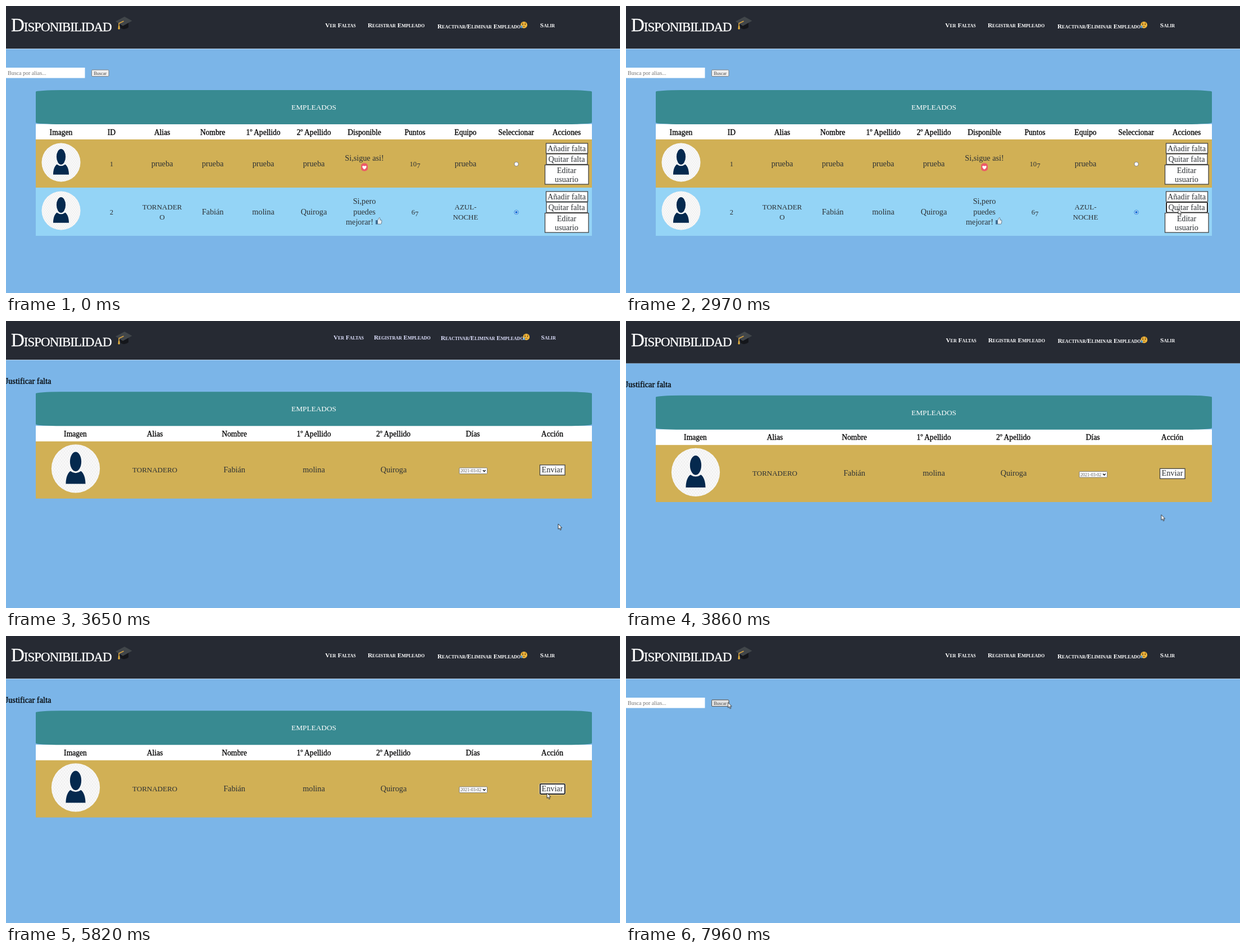
An HTML page for the animation above (8 s loop, 1093 by 512 pixels).

```html
<!DOCTYPE html>
<html lang="es">
<head>
<meta charset="utf-8">
<title>Disponibilidad</title>
<style>
html, body { margin: 0; width: 100%; height: 100%; overflow: hidden; background: #7bb5e8; }
svg { display: block; width: 1093px; height: 512px; }
text { font: 14.2px "Liberation Serif", "Noto Serif", serif; fill: #2c3034; text-anchor: middle; }
.head { font-size: 13.6px; fill: #000; stroke: #000; stroke-width: .3px; }
.caps { font-size: 13px; }
.num { font-size: 12.6px; }
.banner { font-size: 13.3px; fill: #fff; }
.title { font-size: 33px; font-variant: small-caps; letter-spacing: -1px; fill: #fff; stroke: #fff; stroke-width: .3px; text-anchor: start; }
.nav text { font-size: 11.3px; font-weight: bold; font-variant: small-caps; fill: inherit; }
.h1 { font-size: 14.4px; fill: #000; stroke: #000; stroke-width: .3px; text-anchor: start; }
.hint { font-size: 10px; fill: #757575; text-anchor: start; }
.small { font-size: 8.2px; fill: #444; }
.day { font-size: 8px; fill: #555; text-anchor: start; }
.picked { fill: #fff; }
.btn { fill: #fff; stroke: #444; stroke-width: 1.3px; }

/* scenes and states switch hard */
.staff, .search, .absence, .focus1, .focus2, .options, .hover { animation: 8s step-end infinite; }
.staff { animation-name: staff; }
.search { animation-name: search; }
.absence { animation-name: absence; }
.focus1 { animation-name: focus1; }
.focus2 { animation-name: focus2; }
.options { animation-name: options; }
.hover { animation-name: hover; }
@keyframes staff { 0% { visibility: visible } 42.5%, 100% { visibility: hidden } }
@keyframes search { 0%, 84.375% { visibility: visible } 42.5% { visibility: hidden } }
@keyframes absence { 0%, 84.375%, 100% { visibility: hidden } 42.5% { visibility: visible } }
@keyframes focus1 { 0%, 42.5%, 100% { visibility: hidden } 30.875% { visibility: visible } }
@keyframes focus2 { 0%, 84.375%, 100% { visibility: hidden } 71.1% { visibility: visible } }
@keyframes options { 0%, 61.5%, 100% { visibility: hidden } 57.7% { visibility: visible } }
@keyframes hover { 0% { visibility: hidden } 99.3%, 100% { visibility: visible } }

/* menu grows in and pushes the page down */
.push { animation: push 8s linear infinite; }
@keyframes push {
  0%, 42.49% { transform: none }
  42.5%, 43.4% { transform: translateY(-26px); animation-timing-function: cubic-bezier(.3, .3, .6, .9) }
  45.625% { transform: translateY(-7px); animation-timing-function: ease-out }
  49%, 100% { transform: none }
}
.nav { fill: #fff; animation: nav 8s linear infinite; }
@keyframes nav {
  0%, 42.49% { transform: none; fill: #fff }
  42.5% { transform: translate(var(--dx), -35px) scale(.83); fill: #00e; animation-timing-function: cubic-bezier(.3, .3, .5, .9) }
  45.625% { transform: translate(calc(var(--dx) * .115), -5.5px) scale(.98); fill: #e0e2ff; animation-timing-function: ease-out }
  49%, 100% { transform: none; fill: #fff }
}

.cursor { animation: cursor 8s ease-in-out infinite; }
@keyframes cursor {
  0%, .7% { transform: translate(1066px, 514px) }
  9.5%, 11% { transform: translate(1018px, 456px) }
  20.1%, 46.4% { transform: translate(983px, 362px) }
  52%, 52.9% { transform: translate(852px, 291px) }
  57.5%, 61.5% { transform: translate(849px, 275px) }
  71.1%, 90.6% { transform: translate(963px, 280px) }
  99.4%, 100% { transform: translate(181.5px, 118.5px) }
}
</style>
</head>
<body>
<svg id="stage" viewBox="0 0 1093 512">
  <defs>
    <pattern id="mesh" width="4" height="5" patternUnits="userSpaceOnUse">
      <path d="M0 0L4 5M4 0L0 5" stroke="#e6e6e6" stroke-width=".5"/>
    </pattern>
    <g id="avatar">
      <circle r="34.5" fill="#f9f9f9"/>
      <circle r="34.5" fill="url(#mesh)"/>
      <path d="M-14 21.8C-14 13-11.5 6.5-7.5 3.5Q0 9 7.5 3.5C11.5 6.5 14 13 14 21.8Z" fill="#05294e"/>
      <ellipse cy="-10" rx="8.8" ry="14.6" fill="#05294e" stroke="#f9f9f9" stroke-width="1.4"/>
    </g>
    <g id="cry">
      <circle r="6" fill="#f3b73b"/>
      <path d="M-3.6-3l2.2-.8M3.6-3l-2.2-.8M-2 3.2Q0 1.4 2 3.2" fill="none" stroke="#6b4a1c" stroke-width=".9"/>
      <circle cx="-2.2" cy="-1" r="1" fill="#4d3513"/>
      <circle cx="2.2" cy="-1" r="1" fill="#4d3513"/>
      <path d="M-3.7 0Q-6.4 3.5-5 5.4Q-2.6 6.2-2.4 3.8Z" fill="#55a9e8"/>
    </g>
    <g id="heart">
      <rect x="-6" y="-7" width="12" height="14" rx="5" fill="#ec5a68"/>
      <path d="M0 4C-6 0-3.6-4.4 0-1.8C3.6-4.4 6 0 0 4Z" fill="#fff"/>
    </g>
    <g id="thumb">
      <path d="M-2-1L1-6Q3-6 2.3-1.6H5Q6 0 4.8 4.8L3.5 5.6H-2Z" fill="#e6edf2" stroke="#52697c" stroke-width=".8"/>
      <rect x="-5.5" y="-1.4" width="3.4" height="7.4" fill="#3e6c94"/>
    </g>
  </defs>
</svg>
<script>
const text = (x, y, s, cls = '') => `<text x="${x}" y="${y}" class="${cls}">${s}</text>`;
const rect = (x, y, w, h, fill, more = '') =>
  `<rect x="${x}" y="${y}" width="${w}" height="${h}" fill="${fill}" ${more}/>`;
const use = (id, x, y, k = 1) => `<use href="#${id}" transform="translate(${x} ${y}) scale(${k})"/>`;
const group = (cls, ...parts) => `<g class="${cls}">${parts.join('')}</g>`;
const button = (x, y, w, h) => `<rect class="btn" x="${x}" y="${y}" width="${w}" height="${h}"/>`;
const focusRing = (x, y, w, h) =>
  rect(x - 1, y - 1, w + 2, h + 2, 'none', 'rx="2.5" stroke="#fff" stroke-width="1"') +
  rect(x, y, w, h, 'none', 'rx="1.5" stroke="#101010" stroke-width="1.7"');

// banner and heading line shared by both tables
const tableTop = (y, x0, step, heads) =>
  rect(53, y + 60.5, 990, 29, '#fff') +
  rect(53, y, 990, 61, '#388a91', 'rx="45" ry="3"') +
  text(548, y + 35, 'EMPLEADOS', 'banner') +
  heads.map((s, i) => text(x0 + i * step, y + 79.5, s, 'head')).join('');

const radio = (y, on) =>
  `<circle cx="908.5" cy="${y}" r="3.7" fill="#fff" stroke="${on ? '#0b6fd6' : '#767676'}" stroke-width=".9"/>` +
  (on ? `<circle cx="908.5" cy="${y}" r="2.2" fill="#0b6fd6"/>` : '');

const actions = y =>
  button(961.5, y + 7, 74, 18) + text(998, y + 20.5, 'Añadir falta') +
  button(962, y + 26, 73, 18.5) + text(998, y + 40, 'Quitar falta') +
  button(959.5, y + 45.5, 77.5, 34.5) + text(998, y + 59.5, 'Editar') + text(998, y + 75.5, 'usuario');

const staffRow = (y, fill, on, cells) =>
  rect(53, y, 990, 86, fill) + use('avatar', 98, y + 41) + cells + radio(y + 44, on) + actions(y);

const search =
  rect(0, 110, 140.5, 18.5, '#fff') + text(3, 123, 'Busca por alias...', 'hint') +
  rect(152.5, 114, 30.5, 11.5, '#efefef', 'rx="1.5" stroke="#767676" stroke-width=".9"') +
  group('hover', rect(152.5, 114, 30.5, 11.5, '#e2e2e2', 'rx="1.5" stroke="#4f4f4f" stroke-width=".9"')) +
  text(167.7, 122.5, 'Buscar', 'small');

const row1 = text(188, 286, '1', 'num') +
  [278, 368, 458, 548, 818].map(x => text(x, 286, 'prueba')).join('') +
  text(638, 276, 'Si,sigue asi!') + use('heart', 638, 287.5) +
  text(728, 286, '10<tspan dy="3">7</tspan>', 'num');

const row2 = text(188, 372, '2', 'num') +
  text(278, 362.5, 'TORNADER', 'caps') + text(278, 381, 'O', 'caps') +
  text(368, 372, 'Fabián') + text(458, 372, 'molina') + text(548, 372, 'Quiroga') +
  text(638, 353, 'Si,pero') + text(638, 371.5, 'puedes') + text(629.5, 390, 'mejorar!') +
  use('thumb', 663.5, 383.5) + text(728, 372, '6<tspan dy="3">7</tspan>', 'num') +
  text(818, 362.5, 'AZUL-', 'caps') + text(818, 381, 'NOCHE', 'caps');

const staff = tableTop(150, 98, 90,
  ['Imagen', 'ID', 'Alias', 'Nombre', '1º Apellido', '2º Apellido', 'Disponible',
   'Puntos', 'Equipo', 'Seleccionar', 'Acciones']) +
  staffRow(238, '#d1b055', false, row1) + staffRow(324, '#94d4f6', true, row2) +
  group('focus1', focusRing(962, 350, 73, 18.5));

const absence = text(-1.5, 118.5, 'Justificar falta', 'h1') +
  tableTop(133.3, 123.5, 141.5,
    ['Imagen', 'Alias', 'Nombre', '1º Apellido', '2º Apellido', 'Días', 'Acción']) +
  rect(53, 221.7, 990, 102, '#d1b055') + use('avatar', 124, 270.3, 1.25) +
  text(265, 277, 'TORNADERO', 'caps') + text(406.5, 277, 'Fabián') +
  text(548, 277, 'molina') + text(690, 277, 'Quiroga') +
  rect(807, 269, 49.5, 10.5, '#fff', 'rx="1" stroke="#767676" stroke-width=".9"') +
  text(809, 277.3, '2021-03-02', 'day') +
  '<path d="M849 273l2.3 2.4L853.6 273" fill="none" stroke="#111" stroke-width="1.4"/>' +
  group('options', rect(807, 280.5, 50.5, 11, '#5f6670', 'opacity=".5"') +
    rect(806.5, 280, 50, 10.5, '#1e90ff') + text(809, 288, '2021-03-02', 'day picked')) +
  button(950.5, 263.8, 44.5, 18) + text(972.5, 277, 'Enviar') +
  group('focus2', focusRing(950.8, 264, 44, 17.8));

const navItem = (x, y, dx, s, extra = '') =>
  `<g transform="translate(${x} ${y})"><g class="nav" style="--dx:${dx}px">${text(0, 0, s)}${extra}</g></g>`;

const header =
  group('push', rect(0, -60, 1093, 136, '#262a33'), rect(0, 76, 1093, 1, '#b9d4ec')) +
  text(9, 45, 'Disponibilidad', 'title') +
  `<path d="M203 31L204 39Q211 44 218 38V29Z" fill="#14161b"/>
   <path d="M195 27.5L211 19L224.5 26.5L208 35.5Z" fill="#41464a"/>
   <path d="M209.5 27L201 31V37" fill="none" stroke="#d9a441" stroke-width="1.6"/>
   <path d="M200 35.5h2.2l.6 5.5q-1.8 1.4-3.4 0z" fill="#e9b33f"/>` +
  navItem(595.5, 38, 126.5, 'Ver Faltas') +
  navItem(694.5, 38, 95.5, 'Registrar Empleado') +
  navItem(842, 39.5, 51, 'Reactivar/Eliminar Empleado', use('cry', 80, -5.7)) +
  navItem(964, 38, 14, 'Salir');

const cursor = group('cursor',
  '<path d="M0 0V9.4L2.2 7.5L3.7 11L5.3 10.3L3.8 7H6.7Z" fill="#fff" stroke="#111" stroke-width=".8"/>');

document.getElementById('stage').insertAdjacentHTML('beforeend',
  group('search', search) + group('staff', staff) +
  group('push', group('absence', absence)) + header + cursor);
</script>
</body>
</html>
```
